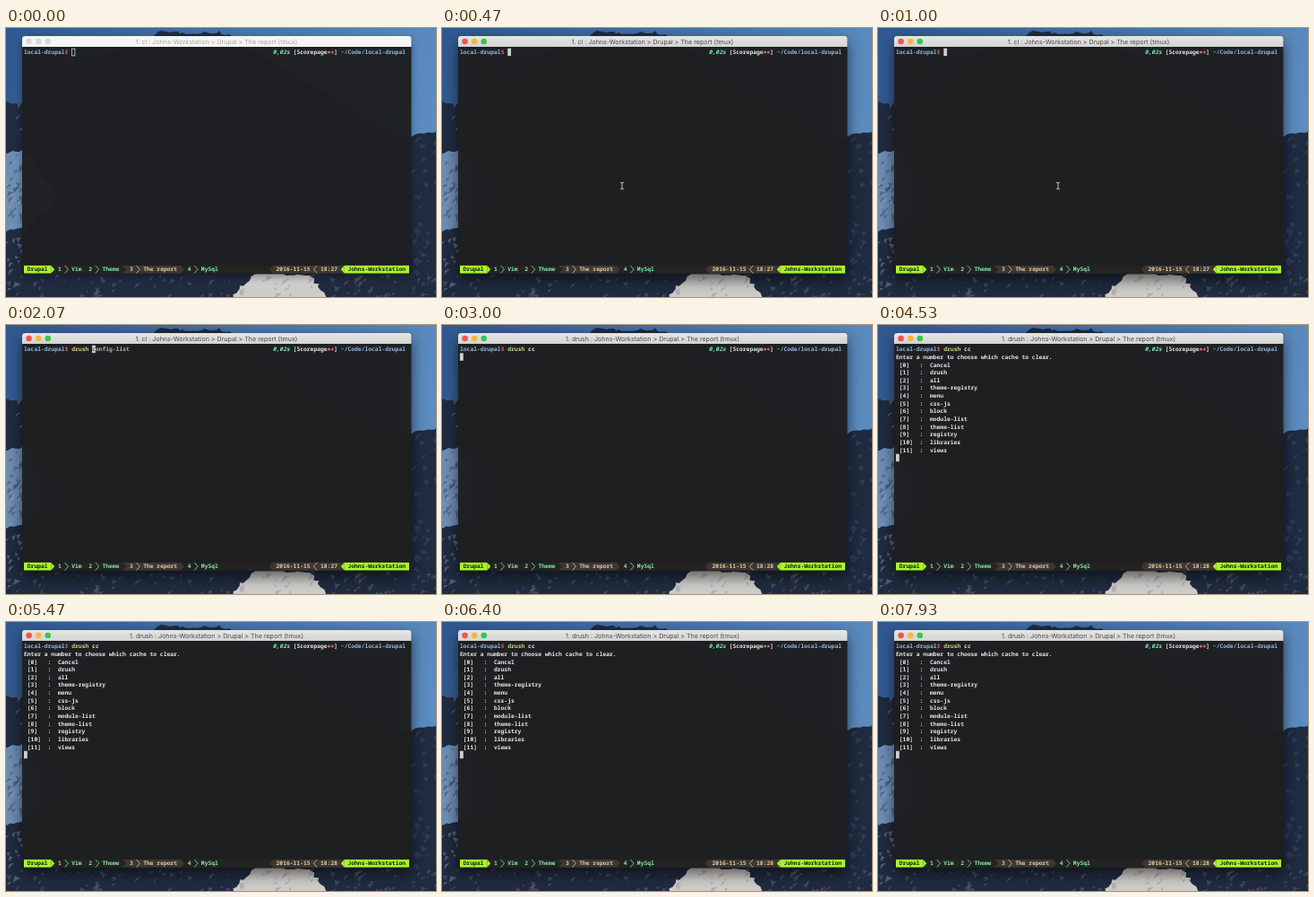
Recreate the animation shown at these times as an HTML page with a canvas. Size 480x300 px, loop 8 s.

```html
<!DOCTYPE html>
<html lang="en">
<head>
<meta charset="utf-8">
<title>Terminal session</title>
<style>
  html, body { margin: 0; width: 100%; height: 100%; overflow: hidden; background: #1f2c42; }
  canvas { display: block; }
</style>
</head>
<body>
<canvas id="stage" width="480" height="300"></canvas>
<script>
const stage = document.getElementById('stage');
const photo = new OffscreenCanvas(stage.width, stage.height);
let ctx;

// Terminal grid
const COL = 3.805, ROW = 8.65, LEFT = 20, TOP = 22.7, COLUMNS = 113;
const MONO = '6.34px "Noto Sans Mono", "DejaVu Sans Mono", monospace';
const LIME = '#a9f52b', MINT = '#7fe8ae', PEACH = '#e5c79a', BLUE = '#8fb9de';
const WHITE = '#e6e6e2', RED = '#e0655c', TAB = '#3d3733', INK = '#18200c';
const HOST = 'Johns-Workstation';
const TABS = ['Vim', 'Theme', 'The report', 'MySql'];
const CACHES = ['Cancel', 'drush', 'all', 'theme-registry', 'menu', 'css-js',
  'block', 'module-list', 'theme-list', 'registry', 'libraries', 'views'];

// Moments of the session, in ms
const LOOP = 8000, POINTER = 200, FOCUS = 470, TYPING = 1200, KEY = 140;
const ENTER = 2800, CLOCK = 3000, PROMPT = 3530, LIST = 4200;
const COMMAND = 'drush cc', SUGGESTION = 'drush config-list';

const colX = col => LEFT + col * COL;
const rowY = row => TOP + row * ROW;
const STATUS_Y = rowY(28);

function cell(str, col, row, color, style = '600') {
  ctx.font = `${style} ${MONO}`;
  ctx.fillStyle = color;
  ctx.fillText(str, colX(col), rowY(row) + 6.5);
}

function dot(x, y, r, color) {
  ctx.fillStyle = color;
  ctx.beginPath();
  ctx.arc(x, y, r, 0, 7);
  ctx.fill();
}

function gradient(x1, y1, from, to) {
  const g = ctx.createLinearGradient(0, 0, x1, y1);
  g.addColorStop(0, from);
  g.addColorStop(1, to);
  return g;
}

let seed = 7;
function random() {
  seed = (seed * 16807) % 2147483647;
  return seed / 2147483647;
}
const jitter = amount => (random() - 0.5) * amount;

// Polygon with rough edges
function rock(color, ...points) {
  ctx.fillStyle = color;
  ctx.beginPath();
  points.forEach(([x, y], i) => {
    const [nextX, nextY] = points[(i + 1) % points.length];
    const steps = Math.ceil(Math.hypot(nextX - x, nextY - y) / 4);
    for (let k = 0; k < steps; k++) {
      const f = k / steps;
      ctx.lineTo(x + (nextX - x) * f + jitter(4), y + (nextY - y) * f + jitter(4));
    }
  });
  ctx.fill();
}

function speckle(color, count, x, y, width, height) {
  for (let i = 0; i < count; i++) {
    const px = x + random() * width, py = y + random() * height, size = 2 + random() * 5;
    ctx.fillStyle = color;
    ctx.beginPath();
    ctx.moveTo(px, py);
    ctx.lineTo(px + size, py + jitter(size));
    ctx.lineTo(px + jitter(size), py + size);
    ctx.fill();
  }
}

function paintPhoto() {
  ctx = photo.getContext('2d');
  ctx.fillStyle = gradient(480, 110, '#30588f', '#5c8dc0');
  ctx.fillRect(0, 0, 480, 300);
  rock('#202b40', [-5, 82], [20, 85], [140, 12], [175, 5], [242, 5], [300, 40],
    [440, 122], [485, 113], [485, 305], [-5, 305]);
  rock('#6d8db5', [-5, 140], [20, 136], [60, 190], [20, 224], [-5, 228]);
  rock('#cfcdc9', [278, 272], [338, 276], [362, 303], [250, 303]);
  speckle('rgba(150,165,190,.4)', 30, 0, 85, 18, 210);
  speckle('rgba(20,30,50,.3)', 25, 0, 140, 18, 85);
  speckle('rgba(120,125,140,.35)', 90, 0, 274, 480, 26);
  speckle('rgba(80,95,125,.35)', 40, 450, 122, 30, 178);
}

function drawWindow(active, program) {
  ctx.save();
  ctx.shadowColor = `rgba(0,0,0,${active ? 0.6 : 0.35})`;
  ctx.shadowBlur = active ? 16 : 9;
  ctx.shadowOffsetY = active ? 6 : 3;
  ctx.fillStyle = 'rgba(31,32,34,.96)';
  ctx.beginPath();
  ctx.roundRect(18, 9, 434.5, 265.5, 3);
  ctx.fill();
  ctx.restore();

  ctx.fillStyle = active ? gradient(0, 21, '#f4f4f4', '#d3d3d3') : '#f5f5f5';
  ctx.beginPath();
  ctx.roundRect(18, 9, 434.5, 12, [3, 3, 0, 0]);
  ctx.fill();
  ['#f4524d', '#f5b83d', '#34c84a'].forEach((color, i) =>
    dot(25.6 + 10.6 * i, 15, 3.3, active ? color : '#d8d8d8'));

  ctx.font = '7.1px Inter, Roboto, sans-serif';
  ctx.fillStyle = active ? '#484848' : '#a5a5a5';
  ctx.textAlign = 'center';
  ctx.fillText(`1. ${program} : ${HOST} > Drupal > The report (tmux)`, 235, 17.5);
  ctx.textAlign = 'left';
}

// Arrow tip filling one column of the status bar; dir is 1 for right, -1 for left
function arrow(col, color, dir, filled) {
  const base = colX(dir > 0 ? col : col + 1), tip = base + COL * dir;
  ctx.fillStyle = ctx.strokeStyle = color;
  ctx.lineWidth = 0.8;
  ctx.beginPath();
  ctx.moveTo(base, STATUS_Y);
  ctx.lineTo(tip, STATUS_Y + ROW / 2);
  ctx.lineTo(base, STATUS_Y + ROW);
  filled ? ctx.fill() : ctx.stroke();
}

function band(from, to, color) {
  ctx.fillStyle = color;
  ctx.fillRect(colX(from), STATUS_Y, (to - from) * COL, ROW);
}

function drawStatus(clock) {
  const bar = '#252322';
  band(0, COLUMNS, bar);
  band(0, 8, LIME);
  arrow(8, LIME, 1, true);
  cell('Drupal', 1, 28, INK, '700');

  let col = 10;
  TABS.forEach((name, i) => {
    const current = name === 'The report', color = current ? PEACH : MINT;
    const end = col + 4 + name.length;
    if (current) {
      band(col - 2, end + 1, TAB);
      arrow(col - 2, bar, 1, true);
      arrow(end + 1, TAB, 1, true);
    }
    cell(i + 1, col, 28, color);
    arrow(col + 2, color, 1);
    cell(name, col + 4, 28, color);
    // The current tab has an arrow on either side
    col = end + (current || TABS[i + 1] === 'The report' ? 3 : 2);
  });

  const host = COLUMNS - 1 - HOST.length;
  band(host - 22, host - 1, TAB);
  arrow(host - 23, TAB, -1, true);
  cell('2016-11-15', host - 21, 28, PEACH);
  arrow(host - 10, PEACH, -1);
  cell(clock, host - 8, 28, PEACH);
  band(host - 1, COLUMNS, LIME);
  arrow(host - 2, LIME, -1, true);
  cell(HOST, host, 28, INK, '700');
}

function drawCursor(col, row, active) {
  const x = colX(col), y = rowY(row);
  if (active) {
    ctx.fillStyle = '#cfcfcc';
    ctx.fillRect(x, y, COL, 8.4);
  } else {
    ctx.strokeStyle = '#cfcfcc';
    ctx.lineWidth = 0.8;
    ctx.strokeRect(x + 0.2, y + 0.4, COL - 0.4, 7.8);
  }
}

function drawPrompt() {
  cell('local-drupal', 0, 0, BLUE);
  cell('$', 12, 0, RED);
  cell('0,02s', 73, 0, MINT, 'italic 600');
  cell('[Scorepage', 79, 0, WHITE);
  dot(colX(89.5), 27.1, 1.5, RED);
  dot(colX(90.5), 27.1, 1.5, '#b9696b');
  cell(']', 91, 0, WHITE);
  cell('~/Code/local-drupal', 93, 0, BLUE);
}

function drawSession(t) {
  drawPrompt();
  const count = Math.min(COMMAND.length, Math.max(0, Math.floor((t - TYPING) / KEY)));
  const typed = COMMAND.slice(0, count);
  cell(typed.slice(0, 5), 14, 0, count < 5 ? RED : '#d3d283');
  cell(typed.slice(5), 19, 0, WHITE);

  if (t < ENTER) {
    drawCursor(14 + count, 0, t >= FOCUS);
    if (count && SUGGESTION.startsWith(typed)) {
      cell(SUGGESTION[count], 14 + count, 0, '#55585b');
      cell(SUGGESTION.slice(count + 1), 15 + count, 0, '#b2b2ae');
    }
    return;
  }
  let row = 1;
  if (t >= PROMPT) cell('Enter a number to choose which cache to clear.', 0, row++, WHITE);
  if (t >= LIST) CACHES.forEach((name, i) =>
    cell(` ${`[${i}]`.padEnd(6)}:  ${name}`, 0, row++, WHITE));
  drawCursor(0, row, true);
}

function drawPointer(x, y) {
  ctx.strokeStyle = '#d8d8d8';
  ctx.lineWidth = 0.9;
  ctx.beginPath();
  for (const side of [-1, 1]) {
    ctx.moveTo(x - 2, y + 4 * side);
    ctx.lineTo(x, y + 3 * side);
    ctx.lineTo(x + 2, y + 4 * side);
    ctx.moveTo(x, y + 3 * side);
    ctx.lineTo(x, y);
  }
  ctx.stroke();
}

function draw(t) {
  ctx.drawImage(photo, 0, 0);
  drawWindow(t >= FOCUS, t < ENTER ? 'cl' : 'drush');
  drawSession(t);
  drawStatus(t < CLOCK ? '18:27' : '18:28');
  if (t >= POINTER && t < TYPING + KEY) drawPointer(201, 176);
}

let start;
function tick(now) {
  start ??= now;
  draw((now - start) % LOOP);
  requestAnimationFrame(tick);
}

paintPhoto();
ctx = stage.getContext('2d');
ctx.textRendering = 'geometricPrecision';
draw(0);
requestAnimationFrame(tick);
</script>
</body>
</html>
```
